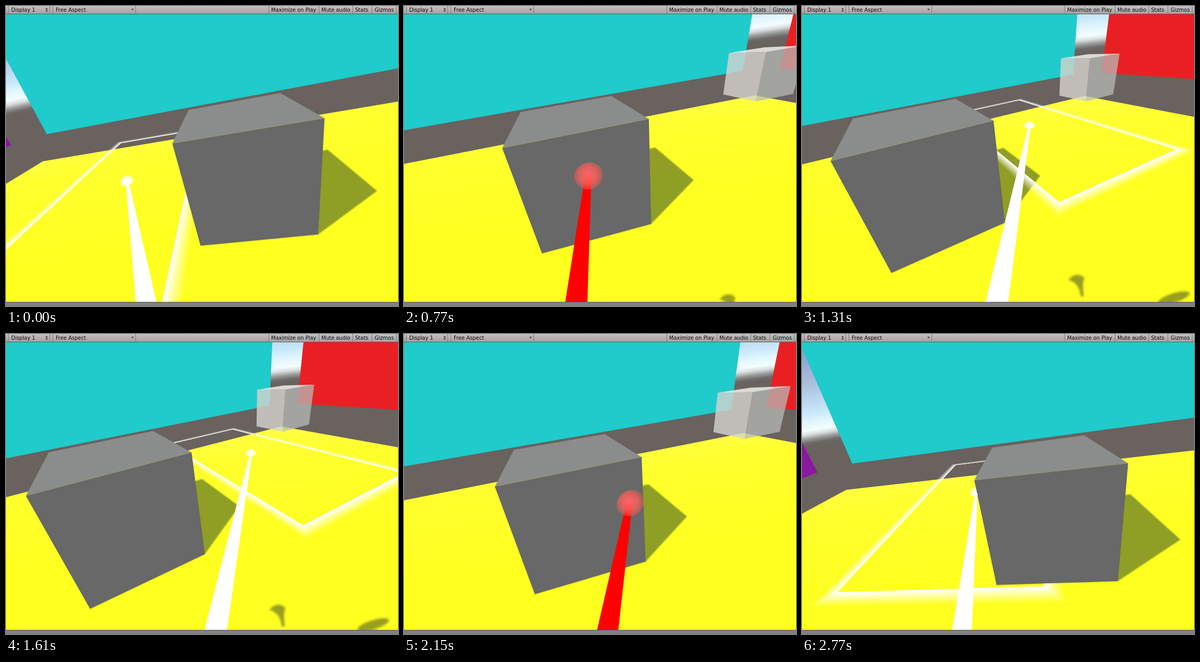
An HTML page with a canvas that plays this animation: 757 by 580 pixels, repeating every 2.84 s.

```html
<!DOCTYPE html>
<html>
<head>
<meta charset="utf-8">
<style>
html, body { margin: 0; width: 100%; height: 100%; overflow: hidden; }
canvas { display: block; }
</style>
</head>
<body>
<canvas id="stage" width="757" height="580"></canvas>
<script>
const ctx = document.getElementById('stage').getContext('2d');
const LOOP = 2840, STEP = 77.15;
const FOCAL = 405, CENTER = [378.5, 294], NEAR = 0.05;

// World: floor at y = 0, solid unit cube at the origin, x along the cyan wall, z towards it.
const FLOOR = { left: -4.15, right: 5.12, back: 3.03 };
const WALL_BOTTOM = 0.63, WALL_TOP = 9, WALL_GAP = 0.47;
const LIGHT = [0.74, 0.46];
const GLASS = [4.72, 2.6];

// Head angles in degrees, sideways hand position, and the floor point aimed at.
const MOVES = [
  { step: 0, yaw: -8.5, pitch: 24.9, roll: 12.3, hand: 0.13, aimX: -1.25, aimZ: 1.36 },
  { step: 5, yaw: -6.2, pitch: 25.2, roll: 11.7, hand: 0.23, aimX: -0.67, aimZ: 1.8 },
  { step: 14, yaw: 20.4, pitch: 28.3, roll: 6.1, hand: 0.44, aimX: 2, aimZ: 2.12 },
  { step: 21, yaw: 24.8, pitch: 27.4, roll: 6.6, hand: 0.52, aimX: 3.05, aimZ: 1.83 },
  { step: 25, yaw: 19.2, pitch: 26.4, roll: 6.6, hand: 0.48, aimX: 2.49, aimZ: 2.11 },
  { step: 31, yaw: 1.8, pitch: 23.6, roll: 9, hand: 0.35, aimX: 0.85, aimZ: 1.95 },
  { step: 36, yaw: -9.4, pitch: 22.3, roll: 9.5, hand: 0.19, aimX: -0.59, aimZ: 2.02 }
];

// Monotone cubic interpolation of one property.
function sample(name, k) {
  const last = MOVES.length - 1;
  let i = 0;
  while (i < last - 1 && k >= MOVES[i + 1].step) i++;
  const slope = j => (MOVES[j + 1][name] - MOVES[j][name]) / (MOVES[j + 1].step - MOVES[j].step);
  const tangent = j => {
    if (j === 0) return slope(0);
    if (j === last) return slope(j - 1);
    const p = slope(j - 1), q = slope(j);
    return p * q > 0 ? 2 * p * q / (p + q) : 0;
  };
  const h = MOVES[i + 1].step - MOVES[i].step, t = (k - MOVES[i].step) / h, u = 1 - t;
  return u * u * (1 + 2 * t) * MOVES[i][name] + t * u * u * h * tangent(i)
       + t * t * (3 - 2 * t) * MOVES[i + 1][name] - t * t * u * h * tangent(i + 1);
}

const mix = (p, q, t) => p.map((v, i) => v + (q[i] - v) * t);
const view = {};

// The head shifts sideways as it turns and sinks as it looks down.
function aimCamera(k) {
  const yaw = sample('yaw', k), pitch = sample('pitch', k);
  view.eye = [0.395 + 0.0015 * yaw, 1.588 - 0.0042 * pitch, -1.34];
  [view.yaw, view.pitch, view.roll] = [yaw, pitch, sample('roll', k)].map(a => a * Math.PI / 180);
}
function rotate([x, y, z]) {
  const { yaw, pitch, roll } = view;
  const right = x * Math.cos(yaw) - z * Math.sin(yaw);
  const ahead = x * Math.sin(yaw) + z * Math.cos(yaw);
  const down = -y * Math.cos(pitch) - ahead * Math.sin(pitch);
  return [
    right * Math.cos(roll) + down * Math.sin(roll),
    down * Math.cos(roll) - right * Math.sin(roll),
    ahead * Math.cos(pitch) - y * Math.sin(pitch)
  ];
}
const toCamera = p => rotate(p.map((v, i) => v - view.eye[i]));
const toScreen = ([x, y, z]) => [CENTER[0] + FOCAL * x / z, CENTER[1] + FOCAL * y / z];

// Projects a world polygon, cut at the near plane.
function face(...corners) {
  const points = corners.map(toCamera), path = new Path2D();
  points.forEach((p, i) => {
    const q = points[(i + 1) % points.length];
    if (p[2] >= NEAR) path.lineTo(...toScreen(p));
    if ((p[2] < NEAR) !== (q[2] < NEAR)) path.lineTo(...toScreen(mix(p, q, (NEAR - p[2]) / (q[2] - p[2]))));
  });
  path.closePath();
  return path;
}
function fill(color, path) {
  ctx.fillStyle = color;
  ctx.fill(path);
}
const floorRect = (x0, z0, x1, z1, y = 0) => face([x0, y, z0], [x1, y, z0], [x1, y, z1], [x0, y, z1]);
const wall = (x0, z0, x1, z1, low, high) => face([x0, low, z0], [x1, low, z1], [x1, high, z1], [x0, high, z0]);

// Gradient across the horizon; stops are [pixels above it, color], from the top down.
function horizonGradient(stops) {
  const along = d => {
    const r = FOCAL * Math.tan(view.pitch) + d;
    return [CENTER[0] - Math.sin(view.roll) * r, CENTER[1] - Math.cos(view.roll) * r];
  };
  const top = stops[0][0], bottom = stops[stops.length - 1][0];
  const g = ctx.createLinearGradient(...along(top), ...along(bottom));
  stops.forEach(([d, color]) => g.addColorStop((top - d) / (top - bottom), color));
  return g;
}

function drawRoom() {
  ctx.fillStyle = horizonGradient([
    [150, '#8c9fd2'], [90, '#aabfdc'], [33, '#c8e8fb'], [15, '#e2f6fc'], [0, '#f2fdff'],
    [-8, '#d8dcdc'], [-16, '#9a9a99'], [-24, '#6c6a69'], [-30, '#69625e']
  ]);
  ctx.fillRect(0, 0, 757, 580);

  const { left, right, back } = FLOOR;
  const side = x => wall(x, back - WALL_GAP, x, -6, WALL_BOTTOM, WALL_TOP);
  fill('#8b18a0', side(left));
  fill('#e92023', side(right));
  fill('#1fcbcb', wall(left + WALL_GAP, back, right - WALL_GAP, back, WALL_BOTTOM, WALL_TOP));
  fill(horizonGradient([[-90, '#ffff4c'], [-170, '#ffff2e'], [-320, '#ffff20']]),
    floorRect(left, -6, right, back));
}

function drawShadows() {
  const [sx, sz] = LIGHT;
  ctx.save();
  ctx.filter = 'blur(1.2px)';
  fill('#8f9e24', face([0, 0, 0], [1, 0, 0], [1 + sx, 0, sz], [1 + sx, 0, 1 + sz], [sx, 0, 1 + sz], [0, 0, 1]));
  ctx.filter = 'blur(2px)';
  const [x, y] = toScreen(toCamera([1.16, 0, -0.77]));
  fill('#9a9e22', new Path2D(`M${x - 21} ${y - 12}Q${x - 6} ${y - 30} ${x + 10} ${y - 16}`
    + `Q${x + 5} ${y - 4} ${x + 9} ${y + 20}H${x + 3}Q${x} ${y - 7} ${x - 21} ${y - 12}Z`));
  const [bx, by] = toScreen(toCamera([1.6, 0, -1.1]));
  ctx.beginPath();
  ctx.ellipse(bx, by, 32, 9, -0.3, 0, 7);
  ctx.fill();
  ctx.restore();
}

function drawGlassBox() {
  const [x, z] = GLASS;
  fill('rgba(238,238,234,.85)', floorRect(x, z, x + 1, z + 1, 1));
  fill('rgba(214,212,207,.8)', wall(x, z, x, z + 1, 0, 1));
  fill('rgba(184,186,184,.74)', wall(x, z, x + 1, z, 0, 1));
}

// Rectangle around the aimed point whose border fades outwards.
function drawPlayArea([x, , z]) {
  const rings = 20, border = 0.15;
  const rect = e => floorRect(x - 1 - e, z - 2.05 - e, x + 1 + e, z + 2.05 + e);
  for (let j = rings; j > 0; j--) {
    const ring = rect(border * j / rings);
    ring.addPath(rect(0));
    ctx.fillStyle = `rgba(255,255,255,${1 / j})`;
    ctx.fill(ring, 'evenodd');
  }
}

// Half ball resting on a surface with the given normal.
function drawMarker(point, normal, colors) {
  const p = toCamera(point), [x, y] = toScreen(p), n = rotate(normal);
  const r = 0.108 * FOCAL / p[2];
  const flatness = Math.abs(p[0] * n[0] + p[1] * n[1] + p[2] * n[2]) / Math.hypot(...p);
  const angle = Math.atan2(n[1] - n[2] * p[1] / p[2], n[0] - n[2] * p[0] / p[2]);
  const glow = ctx.createRadialGradient(x, y, r * 0.2, x, y, r);
  colors.forEach((color, i) => glow.addColorStop(i / (colors.length - 1), color));
  ctx.fillStyle = glow;
  ctx.beginPath();
  ctx.ellipse(x, y, r, r, angle, -Math.PI / 2, Math.PI / 2);
  ctx.ellipse(x, y, r * flatness, r, angle, Math.PI / 2, Math.PI * 1.5);
  ctx.fill();
}

function drawCube() {
  fill('#8b8d8c', floorRect(0, 0, 1, 1, 1));
  fill('#676867', wall(0, 0, 1, 0, 0, 1));
}

function drawBeam(hand, end, color) {
  const tip = toCamera(end);
  let base = toCamera(mix(hand, end, -0.15));
  if (base[2] < NEAR) base = mix(base, tip, (NEAR - base[2]) / (tip[2] - base[2]));
  const path = new Path2D(), half = 0.0235;
  const edge = ([x, y, z], dx) => path.lineTo(...toScreen([x + dx, y, z]));
  edge(tip, -half);
  edge(tip, half);
  edge(base, half);
  edge(base, -half);
  path.closePath();
  fill(color, path);
}

function triangle(x, y, h) {
  fill('#333', new Path2D(`M${x - 2.5} ${y}h5l-2.5 ${h}Z`));
}
function drawFrame() {
  const bar = ctx.createLinearGradient(0, 0, 0, 15);
  bar.addColorStop(0, '#c2c2c2');
  bar.addColorStop(1, '#a2a2a2');
  ctx.fillStyle = bar;
  ctx.fillRect(0, 0, 757, 15);
  ctx.fillStyle = '#5c5c5c';
  ctx.fillRect(0, 15, 757, 1);
  ctx.fillRect(0, 572, 757, 1);
  ctx.fillStyle = '#808080';
  ctx.fillRect(0, 573, 757, 7);
  ctx.fillStyle = '#777';
  for (const x of [4, 84, 90, 250, 507, 604, 669, 706, 753]) ctx.fillRect(x, 0, 1, 15);
  ctx.font = '10px "DejaVu Sans", sans-serif';
  ctx.fillStyle = '#0c0c0c';
  const labels = { 'Display 1': 10, 'Free Aspect': 96, 'Maximize on Play': 512, 'Mute audio': 609, Stats: 674, Gizmos: 712 };
  for (const text in labels) ctx.fillText(text, labels[text], 11);
  triangle(78.5, 6.5, -3);
  triangle(78.5, 8.5, 3);
  triangle(244.5, 5.5, 3);
}

function draw() {
  const k = Math.min(36, Math.floor((performance.now() % LOOP + 12) / STEP));
  aimCamera(k);
  const handX = sample('hand', k);
  const hand = [handX, 1.01, -1.03 - 0.35 * handX * handX];
  const aim = [sample('aimX', k), 0, sample('aimZ', k)];
  const onFront = mix(hand, aim, hand[2] / (hand[2] - aim[2]));
  const blocked = onFront[0] > 0 && onFront[0] < 1;

  drawRoom();
  drawShadows();
  drawGlassBox();
  if (!blocked) {
    drawPlayArea(aim);
    drawMarker(aim, [0, 1, 0], ['#fff', 'rgba(255,255,255,.9)', 'rgba(255,255,225,.55)']);
  }
  drawCube();
  drawBeam(hand, blocked ? onFront : aim, blocked ? '#f00' : '#fff');
  if (blocked) {
    drawMarker(onFront, [0, 0, -1], ['rgba(255,100,100,.92)', 'rgba(250,96,92,.8)', 'rgba(235,90,80,.45)']);
  }
  drawFrame();
  requestAnimationFrame(draw);
}
draw();
</script>
</body>
</html>
```
